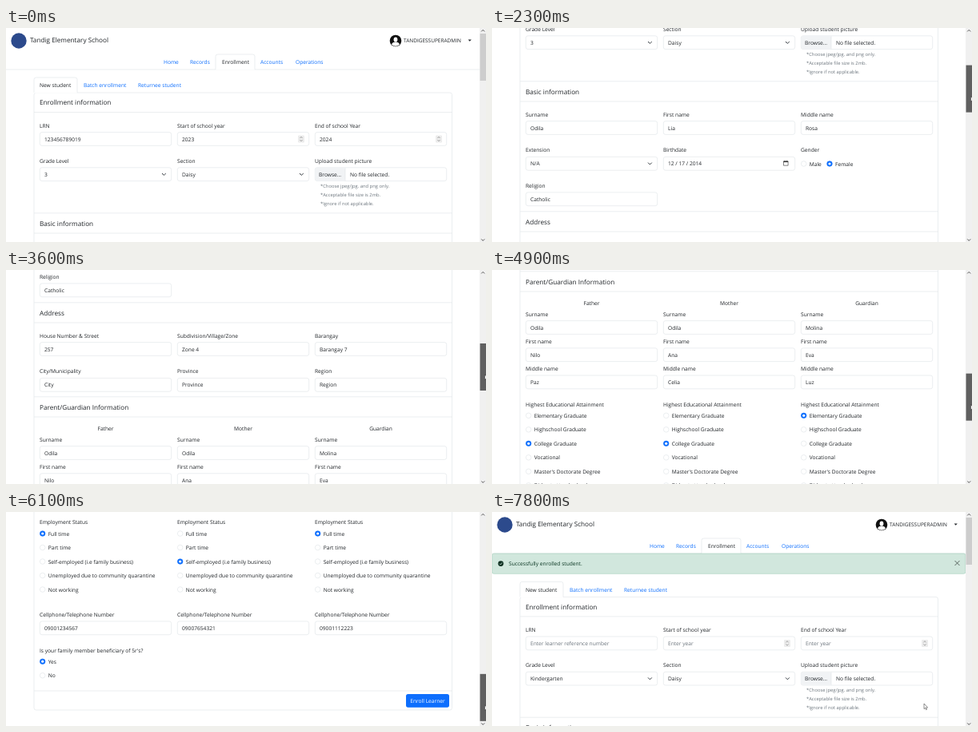
An HTML page for the animation above (8 s loop, 600 px wide and 268 px high).

```html
<!DOCTYPE html>
<html lang="en">
<head>
<meta charset="utf-8">
<title>Student enrollment form</title>
<style>
  html, body { margin: 0; width: 100%; height: 100%; overflow: hidden; background: #fff; }
  svg { display: block; width: 600px; height: 268px; }
  text { font-family: "Open Sans", "Noto Sans", sans-serif; text-rendering: geometricPrecision; white-space: pre; }
</style>
</head>
<body>
<svg id="stage" viewBox="0 0 600 268"></svg>
<script>
const INK = '#212529', BLUE = '#0d6efd', LINE = '#dee2e6', GRAY = '#6c757d';
const COLS = [42, 214, 386], WIDTH = 165;
const LOOP = 8000, DRAG_START = 1000, DRAG_END = 6300, SUBMITTED = 7200;

// y is the middle of the capitals
const text = (x, y, s, { size = 6.65, fill = INK, anchor = 'start' } = {}) =>
  `<text x="${x}" y="${y + size * 0.36}" font-size="${size}" fill="${fill}" text-anchor="${anchor}">${s}</text>`;
const rect = (x, y, w, h, { fill = '#fff', stroke = 'none', r = 0 } = {}) =>
  `<rect x="${x}" y="${y}" width="${w}" height="${h}" rx="${r}" fill="${fill}" stroke="${stroke}" stroke-width=".6"/>`;
const path = (d, { fill = 'none', stroke = 'none', w = 0.6 } = {}) =>
  `<path d="${d}" fill="${fill}" stroke="${stroke}" stroke-width="${w}" stroke-linejoin="round"/>`;
const circle = (x, y, r, fill, stroke = 'none') =>
  `<circle cx="${x}" cy="${y}" r="${r}" fill="${fill}" stroke="${stroke}" stroke-width=".6"/>`;
const rule = (y, x1 = 35, x2 = 557.5) => path(`M${x1} ${y}H${x2}`, { stroke: LINE });

// Extra parts of the special inputs, x is the left edge and y the middle
const extras = {
  text: () => '',
  select: (x, y) => path(`M${x + 153} ${y - 1.2}l2.4 2.4l2.4 -2.4`, { stroke: '#343a40', w: 1 }),
  number: (x, y) => rect(x + 151, y - 4.5, 8, 9, { fill: '#ececec', r: 1 }) +
    path(`M${x + 153.4} ${y - 1}l1.6 -1.8l1.6 1.8M${x + 153.4} ${y + 1}l1.6 1.8l1.6 -1.8`, { stroke: '#777' }),
  date: (x, y) => path(`M${x + 150.5} ${y - 3}h5.6v5.4h-5.6zM${x + 152} ${y - 4}v1M${x + 154.6} ${y - 4}v1`, { stroke: '#333' }) +
    path(`M${x + 150.5} ${y - 2.3}h5.6`, { stroke: '#333', w: 1.2 }),
};

function input(x, y, value, kind = 'text', fill = INK) {
  const box = rect(x + 0.3, y - 8.4, WIDTH - 0.6, 16.8, { stroke: LINE, r: 2.6 });
  return box + text(x + 6, y + 0.2, value, { fill }) + extras[kind](x, y);
}

// One line of labelled inputs; y is the middle of the inputs
const row = (y, labels, values, kinds = [], fill) => labels.map((label, i) =>
  text(COLS[i], y - 16.8, label) + (values[i] ? input(COLS[i], y, values[i], kinds[i], fill) : '')).join('');

const radio = (x, y, label, on) =>
  circle(x + 3.7, y, 3.3, on ? BLUE : '#fff', on ? BLUE : LINE) +
  (on ? circle(x + 3.7, y, 1.6, '#fff') : '') + text(x + 10.7, y + 0.2, label);

const radios = (x, y, labels, picked) =>
  labels.map((label, i) => radio(x, y + i * 17.5, label, i === picked)).join('');

const choices = (y, title, labels, picks) => picks.map((pick, i) =>
  text(COLS[i], y, title) + radios(COLS[i], y + 14, labels, pick)).join('');

const section = (y, title, top = true) =>
  (top ? rule(y - 13.2) : '') + text(42, y, title, { size: 8.2 }) + rule(y + 12);

const tab = (x, y, w) => path(`M${x} ${y + 19}V${y + 2.6}q0 -2.6 2.6 -2.6H${x + w - 2.6}q2.6 0 2.6 2.6V${y + 19}`,
  { fill: '#fff', stroke: LINE });

function header() {
  const links = [[197, 'Home'], [230, 'Records'], [270, 'Enrollment'], [318, 'Accounts'], [362, 'Operations']];
  return circle(16, 16, 9.7, '#2c4a8c') + text(30, 15.5, 'Tandig Elementary School', { size: 8.2 }) +
    circle(487, 16, 7.3, '#111') +
    path('M482 20.8q1 -3.2 5 -3.2t5 3.2q-2 2 -5 2t-5 -2z', { fill: '#fff' }) +
    '<ellipse cx="487" cy="14.4" rx="2.4" ry="3" fill="#fff"/>' +
    text(497, 15.8, 'TANDIGESSUPERADMIN', { size: 6.5 }) + path('M577.6 14.6h4.2l-2.1 2.2z', { fill: INK }) +
    rule(52, 0, 592) + tab(262, 33, 49) + path('M262.4 52H310.6', { stroke: '#fff', w: 1 }) +
    links.map(([x, s]) => text(x, 43, s, { fill: s === 'Enrollment' ? INK : BLUE })).join('');
}

const alertBar = () =>
  rect(0, 52, 592, 25.3, { fill: '#d1e7dd', stroke: '#a3cfbb', r: 2.6 }) +
  circle(11, 64.6, 3.4, '#0c2f20') + path('M9.4 64.7l1.2 1.3l2.1 -2.6', { stroke: '#d1e7dd', w: 0.8 }) +
  text(21, 64.6, 'Successfully enrolled student.', { fill: '#0a3622' }) +
  path('M578.5 61l6 6m0 -6l-6 6', { stroke: '#4c5752', w: 0.9 });

function enrollment(done) {
  const first = done ? ['Enter learner reference number', 'Enter year', 'Enter year'] : ['123456789019', '2023', '2024'];
  const notes = ['*Choose jpeg/jpg. and png only.', '*Acceptable file size is 2mb.', '*Ignore if not applicable.'];
  return rect(35, 81, 522.5, 983, { stroke: LINE, r: 2.6 }) +
    tab(35, 62, 54) + path('M35.4 81H88.6', { stroke: '#fff', w: 1 }) +
    text(42, 71.8, 'New student') + text(97, 71.8, 'Batch enrollment', { fill: BLUE }) +
    text(165, 71.8, 'Returnee student', { fill: BLUE }) +
    section(93.5, 'Enrollment information', false) +
    row(139, ['LRN', 'Start of school year', 'End of school Year'], first, ['text', 'number', 'number'], done ? GRAY : INK) +
    row(183.2, ['Grade Level', 'Section', 'Upload student picture'],
      [done ? 'Kindergarten' : '3', 'Daisy'], ['select', 'select']) +
    rect(386.3, 174.8, WIDTH - 0.6, 16.8, { stroke: LINE, r: 2.6 }) +
    rect(386.6, 175.1, 37.4, 16.2, { fill: '#f1f3f5', r: 2.2 }) + path('M424 175V191.4', { stroke: LINE }) +
    text(391, 183.4, 'Browse...') + text(430, 183.4, 'No file selected.') +
    notes.map((s, i) => text(393, 198 + i * 11, s, { size: 5.8, fill: GRAY })).join('');
}

const details = () =>
  section(245, 'Basic information') +
  row(290, ['Surname', 'First name', 'Middle name'], ['Odila', 'Lia', 'Rosa']) +
  row(334.8, ['Extension', 'Birthdate', 'Gender'], ['N/A', '12 / 17 / 2014'], ['select', 'date']) +
  radio(386, 335, 'Male', false) + radio(418.3, 335, 'Female', true) +
  row(379.3, ['Religion'], ['Catholic']) +
  section(408, 'Address') +
  row(453, ['House Number &amp; Street', 'Subdivision/Village/Zone', 'Barangay'], ['257', 'Zone 4', 'Barangay 7']) +
  row(497.8, ['City/Municipality', 'Province', 'Region'], ['City', 'Province', 'Region']) +
  section(526, 'Parent/Guardian Information') +
  ['Father', 'Mother', 'Guardian'].map((s, i) => text(COLS[i] + 82.5, 553, s, { anchor: 'middle' })).join('') +
  row(583, Array(3).fill('Surname'), ['Odila', 'Odila', 'Molina']) +
  row(617.2, Array(3).fill('First name'), ['Nilo', 'Ana', 'Eva']) +
  row(651.4, Array(3).fill('Middle name'), ['Paz', 'Celia', 'Luz']) +
  choices(679.3, 'Highest Educational Attainment', ['Elementary Graduate', 'Highschool Graduate', 'College Graduate',
    'Vocational', "Master's Doctorate Degree", 'Did not attend school', 'Others'], [2, 2, 0]) +
  choices(829, 'Employment Status', ['Full time', 'Part time', 'Self-employed (i.e family business)',
    'Unemployed due to community quarantine', 'Not working'], [0, 2, 0]) +
  row(961.3, Array(3).fill('Cellphone/Telephone Number'), ['09001234567', '09007654321', '09001112223']) +
  text(42, 989.6, "Is your family member beneficiary of 5r's?") +
  radios(42, 1003.2, ['Yes', 'No'], 0) +
  rule(1040) + rect(500, 1044, 54, 16.7, { fill: BLUE, r: 2.6 }) +
  text(527, 1052.5, 'Enroll Learner', { fill: '#fff', anchor: 'middle' });

const focusRing = '<rect x="41.4" y="129.9" width="166.2" height="18.2" rx="3.4" fill="none" stroke="#0d6efd" stroke-opacity=".25" stroke-width="1.8"/>' +
  rect(42.3, 130.6, 164.4, 16.8, { fill: 'none', stroke: '#86b7fe', r: 2.6 });

const stage = document.getElementById('stage');
stage.innerHTML =
  `<g id="form">${header()}${enrollment(false)}${details()}<g id="focus">${focusRing}<path id="caret" d="M0 135.5V142.9" stroke="#000" stroke-width=".6"/></g></g>` +
  `<g id="result">${header()}<g transform="translate(0 25.4)">${enrollment(true)}${section(245, 'Basic information')}</g>${alertBar()}</g>` +
  rect(592, 0, 8, 268, { fill: '#f0f0f0' }) +
  path('M594.2 4.4l2 -2l2 2M594.2 264.4l2 2l2 -2', { stroke: '#555', w: 1 }) +
  '<rect id="thumb" x="592.5" width="7.5" height="59"/>' +
  `<g id="cursor">${path('M0 0V6.6L1.5 5.3L2.6 7.7L3.6 7.2L2.6 4.9H4.6Z', { fill: '#fff', stroke: '#222', w: 0.5 })}</g>`;

const [form, result, focus, caret, thumb, cursor] =
  ['form', 'result', 'focus', 'caret', 'thumb', 'cursor'].map(id => document.getElementById(id));

const value = [...form.querySelectorAll('text')].find(el => el.textContent === '123456789019');
caret.setAttribute('transform', `translate(${48.5 + value.getComputedTextLength()} 0)`);

// Straight moves between [time, value] stops
function along(stops, t) {
  const next = stops.findIndex(([at]) => at > t);
  if (next < 0) return stops[stops.length - 1][1];
  if (next === 0) return stops[0][1];
  const [t0, a] = stops[next - 1], [t1, b] = stops[next];
  return a + (b - a) * (t - t0) / (t1 - t0);
}

const SCROLL = [[DRAG_START, 0], [1600, 29], [2300, 165], [2700, 225], [2800, 225], [3600, 354], [4900, 511], [6000, 816]];
const POINTER_X = [[300, 160], [DRAG_START, 598.5], [DRAG_END, 598.5], [6900, 540]];
const POINTER_Y = [[300, 139], [DRAG_START, 46], [DRAG_END, 241], [6900, 240]];

function draw(now) {
  const t = Math.floor(now % LOOP / 100) * 100;
  const done = t >= SUBMITTED;
  const scroll = done ? 0 : along(SCROLL, t);
  const top = 7 + scroll * 0.24;
  const dragging = t >= DRAG_START && t < DRAG_END;
  const y = dragging ? top + 39 : along(POINTER_Y, t);

  form.style.display = done ? 'none' : '';
  result.style.display = done ? '' : 'none';
  focus.style.display = t >= 100 ? '' : 'none';
  form.setAttribute('transform', `translate(0 ${-scroll})`);
  thumb.setAttribute('y', top);
  thumb.setAttribute('fill', dragging ? '#606060' : '#cdcdcd');
  cursor.style.display = t >= 300 ? '' : 'none';
  cursor.setAttribute('transform', `translate(${along(POINTER_X, t)} ${y})`);
  requestAnimationFrame(() => draw(performance.now() - start));
}

const start = performance.now();
draw(0);
</script>
</body>
</html>
```
